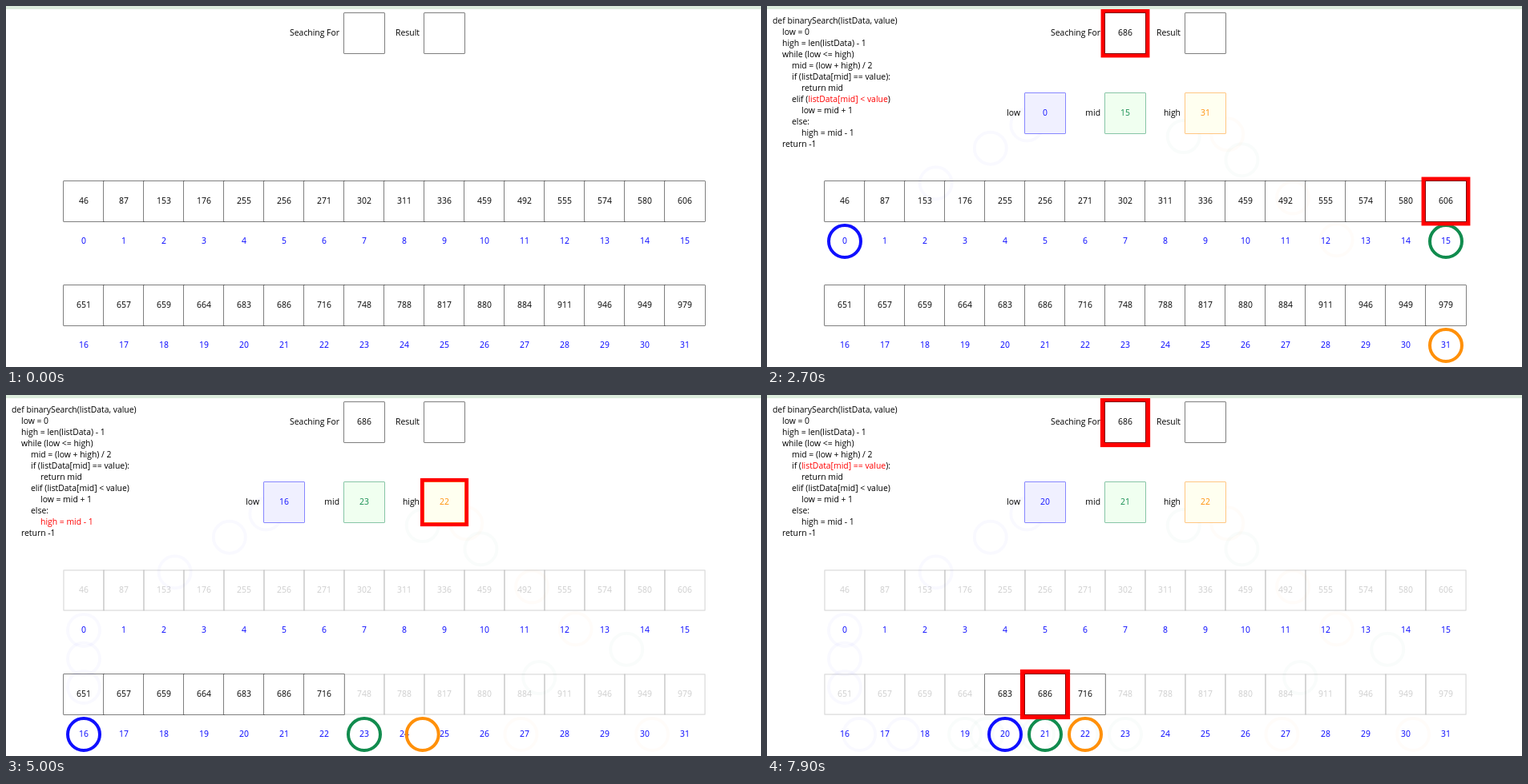
Write an HTML page with a canvas that moves like this. It is 942 by 451 pixels and loops after 8000 ms.

```html
<!DOCTYPE html>
<html lang="en">
<head>
<meta charset="utf-8">
<title>Binary search</title>
<style>
html, body { margin: 0; width: 100%; height: 100%; overflow: hidden; background: #fff; }
canvas { display: block; }
</style>
</head>
<body>
<canvas id="stage" width="942" height="451"></canvas>
<script>
const ctx = document.getElementById("stage").getContext("2d");
const LOOP = 8000, TICK = 100, INTRO = 500;
const MOVES = 11; // positions per step
const RED = "#ff0000";

const data = [
  46, 87, 153, 176, 255, 256, 271, 302, 311, 336, 459, 492, 555, 574, 580, 606,
  651, 657, 659, 664, 683, 686, 716, 748, 788, 817, 880, 884, 911, 946, 949, 979
];
const wanted = 686;

// indent, plain start, part that lights up, plain end
const code = [
  [0, "def binarySearch(listData, value)", "", ""],
  [1, "", "low = 0", ""],
  [1, "", "high = len(listData) - 1", ""],
  [1, "while (", "low <= high", ")"],
  [2, "", "mid = (low + high) / 2", ""],
  [2, "if (", "listData[mid] == value", "):"],
  [3, "", "return mid", ""],
  [2, "elif (", "listData[mid] < value", ")"],
  [3, "", "low = mid + 1", ""],
  [2, "", "else:", ""],
  [3, "", "high = mid - 1", ""],
  [1, "", "return -1", ""]
];

const pointers = {
  high: { x: 547, color: "#ff9009", back: "#fffff0" },
  mid: { x: 447, color: "#118c4e", back: "#f0fff0" },
  low: { x: 347, color: "#1010ff", back: "#f0f0ff" }
};
const names = Object.keys(pointers);

// time in ms -> progress in algorithm steps
const pace = [
  [500, 0.09], [1300, 1.73], [2300, 4.1], [3000, 6.27],
  [4000, 9.02], [4100, 9.02], [5000, 11.73], [6900, 16.64], [8000, 19.6]
];

function progress(t) {
  const i = Math.max(1, pace.findIndex(([end]) => end >= t));
  const [t0, a] = pace[i - 1], [t1, b] = pace[i];
  const s = a + (b - a) * (t - t0) / (t1 - t0);
  return Math.round(s * MOVES) / MOVES;
}

// Thickness of the red frame: a triangle wave between 2 and 7.
function pulse(t) {
  const phase = (t + 510) / 1170 % 1;
  return 2 + 5 * Math.abs(1 - 2 * phase);
}

// Runs the search once and records every step.
function plan() {
  const steps = [];
  const at = { low: null, mid: null, high: null };
  function step(line, lit, change = {}) {
    const from = { ...at };
    Object.assign(at, change);
    steps.push({ line, lit, from, to: { ...at } });
  }
  step(1, ["low"], { low: 0 });
  step(2, ["high"], { high: data.length - 1 });
  while (at.low <= at.high) {
    step(3, ["low", "high"]);
    step(4, ["low", "high"], { mid: Math.floor((at.low + at.high) / 2) });
    const m = at.mid;
    step(5, ["wanted", m]);
    if (data[m] === wanted) break;
    step(7, ["wanted", m]);
    if (data[m] < wanted) step(8, [], { low: m + 1 });
    else step(10, ["high"], { high: m - 1 });
  }
  return steps;
}
const steps = plan();
const stepAt = s => steps[Math.min(steps.length - 1, Math.floor(s))];

const cellX = i => 97 + 50 * (i % 16);
const cellY = i => i < 16 ? 244 : 374;

function spot(name, index) {
  return index === null ? [pointers[name].x, 134] : [cellX(index), cellY(index) + 50];
}

function ringPlace(name, s) {
  const step = stepAt(s), p = s - Math.floor(s);
  const [x0, y0] = spot(name, step.from[name]);
  const [x1, y1] = spot(name, step.to[name]);
  return [x0 + (x1 - x0) * p, y0 + (y1 - y0) * p];
}

function write(str, x, y, color = "#000", align = "center") {
  ctx.fillStyle = color;
  ctx.textAlign = align;
  ctx.fillText(str, x, y + 3);
}

function ring(name, s, alpha = 1) {
  ctx.globalAlpha = alpha;
  ctx.strokeStyle = pointers[name].color;
  ctx.lineWidth = 4;
  ctx.beginPath();
  ctx.arc(...ringPlace(name, s), 20, 0, Math.PI * 2);
  ctx.stroke();
  ctx.globalAlpha = 1;
}

// Each ring leaves faint marks in the first half of its way.
function drawTrails(now) {
  for (let t = INTRO; t < now; t += TICK) {
    const s = progress(t), { from, to } = stepAt(s);
    if (s % 1 > 0.56) continue;
    for (const name of names) {
      if (from[name] !== to[name]) ring(name, s, 0.022);
    }
  }
}

// The fill follows the outline, so only its outer half stays.
function box(x, y, str, { color = "#000", back = "#fff", alpha = 1, frame = 0 } = {}) {
  if (frame) {
    const r = 26 + frame;
    ctx.fillStyle = RED;
    ctx.fillRect(x - r, y - r, 2 * r, 2 * r);
  }
  ctx.globalAlpha = alpha;
  ctx.strokeStyle = color;
  ctx.lineWidth = 1;
  ctx.strokeRect(x - 25, y - 25, 50, 50);
  ctx.fillStyle = back;
  ctx.fillRect(x - 25, y - 25, 50, 50);
  write(str, x, y, color);
  ctx.globalAlpha = 1;
}

function drawCode(active) {
  code.forEach(([indent, ...parts], row) => {
    let x = 7 + 12 * indent;
    parts.forEach((part, k) => {
      write(part, x, 19 + 14 * row, k === 1 && row === active ? RED : "#000", "left");
      x += ctx.measureText(part).width;
    });
  });
}

function draw(time) {
  const t = Math.floor(time / TICK) * TICK;
  const running = t >= INTRO;
  const s = running ? progress(t) : 0;
  const step = stepAt(s);
  const frame = pulse(t);
  const onTop = [];

  function place(key, x, y, str, style = {}) {
    if (running && step.lit.includes(key)) onTop.push(() => box(x, y, str, { ...style, frame }));
    else box(x, y, str, style);
  }

  ctx.fillStyle = "#fff";
  ctx.fillRect(0, 0, 942, 451);
  ctx.font = '10.4px "Open Sans", "Noto Sans", sans-serif';
  ctx.textBaseline = "alphabetic";

  write("Seaching For", 416, 34, "#000", "right");
  write("Result", 516, 34, "#000", "right");
  place("wanted", 447, 34, running ? wanted : "");
  place("result", 547, 34, "");

  data.forEach((n, i) => {
    const { low, high } = step.to;
    const out = running && (i < low || (high !== null && i > high));
    place(i, cellX(i), cellY(i), n, { alpha: out ? 0.2 : 1 });
    write(i, cellX(i), cellY(i) + 50, "#0000ff");
  });

  if (running) {
    drawCode(step.line);
    drawTrails(t);
    for (const name of names) {
      const { x, color, back } = pointers[name];
      write(name, x - 31, 134, "#000", "right");
      place(name, x, 134, step.to[name] ?? "", { color, back });
    }
    for (const name of names) ring(name, s);
  }
  onTop.forEach(paint => paint());

  ctx.fillStyle = "#dcecdc";
  ctx.fillRect(0, 0, 942, 4);
}

const start = performance.now();
function tick() {
  draw((performance.now() - start) % LOOP);
  requestAnimationFrame(tick);
}
tick();
</script>
</body>
</html>
```
